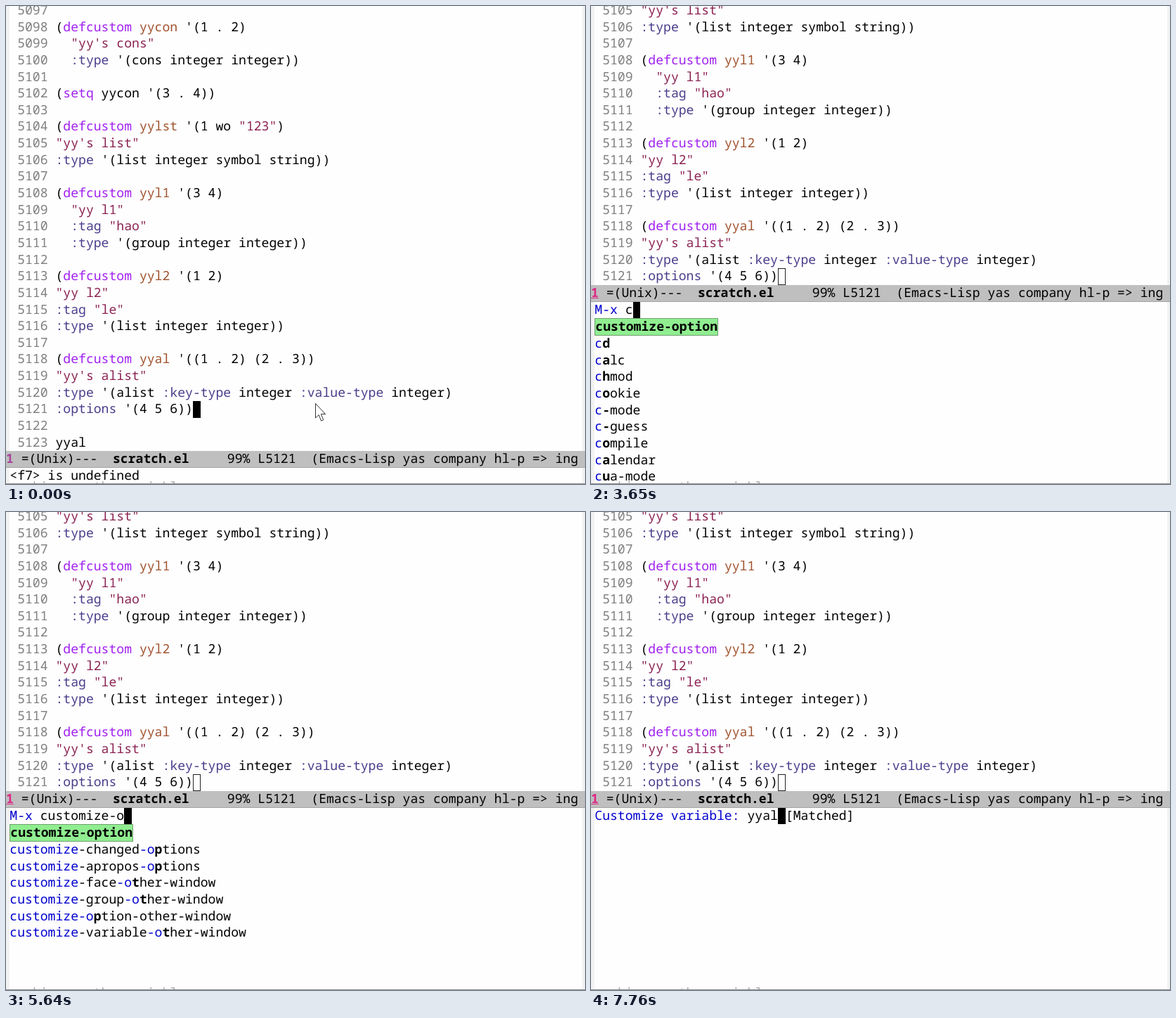
An HTML page that plays this animation: 824x680 px, repeating every 8 s.

```html
<!DOCTYPE html>
<html lang="en">
<head>
<meta charset="utf-8">
<title>Customize option</title>
<style>
  html, body { margin: 0; width: 100%; height: 100%; overflow: hidden; background: #fefefe; }
  #stage {
    position: relative; width: 824px; height: 680px; overflow: hidden; background: #fefefe;
    font: 18.1px "Noto Sans Mono", monospace; color: #000;
    text-rendering: geometricPrecision; font-variant-ligatures: none;
  }
  #stage div, svg { position: absolute; box-sizing: border-box; }
  .row { height: 23.64px; line-height: 22.04px; white-space: pre; }
  .fringe { top: 0; height: 680px; background: #f2f2f2; }
  .under { left: 0; top: 675px; width: 824px; height: 5px; overflow: hidden; border-bottom: 1px solid #8c8c8c; }
  .under .row { color: #a8a8a8; }
  .mode { width: 824px; background: #bfbfbf; border-bottom: 1px solid #a4a4a4; }
  .solid { width: 10.86px; background: #000; color: #fff; }
  .hollow { width: 10.86px; border: 1px solid #222; }
  .pick { height: 25.2px; line-height: 22.4px; font-weight: bold; background: #90ee90; border: 1px solid #6f9f6f; }
  .num { color: #7f7f7f; }
  .key { color: #a020f0; }
  .var { color: #a0522d; }
  .str { color: #8b2252; }
  .sym { color: #483d8b; }
  .hit { color: #0000cd; }
  .win { color: #a8469a; font-weight: bold; }
  .split .win { color: #dc2a86; text-decoration: underline; }
</style>
</head>
<body>
<div id="stage"></div>
<script>
const LOOP = 8000, CELL = 10.86, LINE = 23.64, LEFT = 5.3, TOP = -5;
const FIRST = 5097, POINT = 5121;
const stage = document.getElementById('stage');

const code = `
(defcustom yycon '(1 . 2)
  "yy's cons"
  :type '(cons integer integer))

(setq yycon '(3 . 4))

(defcustom yylst '(1 wo "123")
"yy's list"
:type '(list integer symbol string))

(defcustom yyl1 '(3 4)
  "yy l1"
  :tag "hao"
  :type '(group integer integer))

(defcustom yyl2 '(1 2)
"yy l2"
:tag "le"
:type '(list integer integer))

(defcustom yyal '((1 . 2) (2 . 3))
"yy's alist"
:type '(alist :key-type integer :value-type integer)
:options '(4 5 6))

yyal`.split('\n');

const words = s => s.split(' ');
const OPTION = 'customize-option';
const family = names => words(names).map(n => 'customize-' + n);

const recent = [OPTION, ...words('eval-buffer ielm list-packages find-library describe-variable ' +
  'global-display-fill-column-indicator-mode emacs-lisp-mode cd calc')];
const onC = [OPTION, ...words('cd calc chmod cookie c-mode c-guess compile calendar cua-mode')];
const onCu = [OPTION, ...words('cua-mode customize Custom-set Custom-mode Custom-save ' +
  'cua-set-mark customize-face customize-mode Custom-newline')];
const onCus = [OPTION, ...words('customize Custom-set Custom-mode Custom-save customize-face ' +
  'customize-mode Custom-newline Custom-no-edit customize-saved')];
const themes = family('face mode saved rogue group themes browse unsaved');
const onCustomi = [OPTION, 'customize', ...themes];
const onDash = [OPTION, ...themes, 'customize-changed'];
const onO = [OPTION, ...family('changed-options apropos-options face-other-window ' +
  'group-other-window option-other-window variable-other-window')];
const options = words('yyal cua-mode msb-mode ido-mode help-char word-wrap baud-rate ctl-arrow fido-mode tab-width');
const mine = words('yyal yyl1 yyl2 yycon yylst');
const onY = [...mine, ...words('yas-indent-line yas-snippet-dirs yas-trigger-symbol yas-prompt-functions yas-triggers-in-field')];

const echo = text => ({ text });
const mx = (input, list, hint) => ({ prompt: 'M-x ', input, list, hint });
const ask = (input, list, hint) => ({ prompt: 'Customize variable: ', input, list, hint });

const steps = [
  [0, echo('&lt;f7> is undefined')],
  [650, echo('')],
  [1640, echo('C-x-')],
  [2040, echo('yyal')],
  [3110, { prompt: 'M-x ', input: '', small: true }],
  [3180, mx('', recent)],
  [3650, mx('c', onC)],
  [3780, mx('cu', onCu)],
  [3910, mx('cus', onCus, '(tom)')],
  [4180, mx('cust', onCus, '(om)')],
  [4310, mx('custo', onCus, '(m)')],
  [4510, mx('custom', onCus)],
  [4710, mx('customi', onCustomi, '(ze)')],
  [4780, mx('customiz', onCustomi, '(e)')],
  [4980, mx('customize', onCustomi)],
  [5110, mx('customize-', onDash)],
  [5640, mx('customize-o', onO)],
  [5770, mx('customize-op', onO)],
  [5900, mx('customize-opt', onO)],
  [6030, mx('customize-opti', onO)],
  [6230, mx('customize-optio', onO)],
  [6360, mx(OPTION, onO)],
  [6560, ask('')],
  [6630, ask('', options)],
  [7360, ask('y', onY)],
  [7490, ask('yy', mine)],
  [7620, ask('yya', null, '(l) [Matched]')],
  [7760, ask('yyal', null, ' [Matched]')]
];

const span = (cls, text) => `<span class="${cls}">${text}</span>`;
const put = (x, y, html, cls = '') =>
  `<div class="row ${cls}" style="left:${x.toFixed(2)}px;top:${y.toFixed(2)}px">${html}</div>`;
const col = n => LEFT + n * CELL;

const paint = line => line.replace(
  /("[^"]*")|(defcustom|setq)\b|(?<=defcustom )(\S+)|(:[a-z-]+)/g,
  (m, str, key, name) => span(str ? 'str' : key ? 'key' : name ? 'var' : 'sym', m));

function editor(first, last) {
  let html = '';
  for (let n = first; n <= last; n++)
    html += put(LEFT, TOP + (n - first) * LINE, ' ' + span('num', n) + ' ' + paint(code[n - FIRST]));
  return html;
}

// Matched letters are blue, the letter that would follow is bold.
function mark(name, input) {
  const head = input.split('-')[0].length, tail = input.slice(head);
  const at = name.indexOf(tail, head);
  if (at < 0) return null;
  const end = at + tail.length;
  return span('hit', name.slice(0, head)) + name.slice(head, at) + span('hit', tail) +
    `<b>${name.slice(end, end + 1)}</b>` + name.slice(end + 1);
}

function minibuffer(s, y) {
  if (s.text !== undefined) return put(LEFT, y, s.text);
  const hint = s.hint || ' ', at = s.prompt.length + s.input.length;
  let html = put(LEFT, y, span('hit', s.prompt) + s.input) +
    put(col(at), y, hint[0], 'solid') + put(col(at + 1), y, hint.slice(1));
  if (!s.list) return html;
  const [best, ...rest] = s.list;
  html += put(LEFT, y + LINE, best, 'pick');
  rest.map(n => mark(n, s.input)).filter(Boolean)
    .forEach((m, i) => { html += put(LEFT, y + 1.4 + (i + 2) * LINE, m); });
  return html;
}

const modeText = span('win', '1') + ' =(Unix)---  <b>scratch.el</b>     99% L5121  ' +
  '(Emacs-Lisp yas company hl-p => ing';
const arrow = `<svg style="left:439px;top:564px" width="18" height="29">
  <path d="M1.5 1.5V22L6.2 17.6 9.5 26.2 12.8 24.8 9.3 16.6H15.6Z" fill="#fff" stroke="#333"/></svg>`;

function draw(s) {
  const typing = s.prompt !== undefined, split = typing && !s.small;
  const first = split ? 5105 : FIRST, rows = split ? 17 : 27;
  const bar = TOP + rows * LINE;
  stage.className = split ? 'split' : '';
  stage.innerHTML =
    '<div class="fringe" style="left:0;width:5px"></div><div class="fringe" style="left:820px;width:4px"></div>' +
    `<div class="under">${put(LEFT, -2, 'working on the variable:')}</div>` +
    editor(first, first + rows - 1) +
    put(col(24), TOP + (POINT - first) * LINE, '', typing ? 'hollow' : 'solid') +
    put(0, bar, modeText, 'mode') +
    minibuffer(s, bar + LINE) +
    (typing ? '' : arrow);
}

let shown = -1;
function tick() {
  const t = performance.now() % LOOP;
  const i = steps.findLastIndex(([at]) => at <= t);
  if (i !== shown) draw(steps[shown = i][1]);
  requestAnimationFrame(tick);
}
tick();
</script>
</body>
</html>
```
